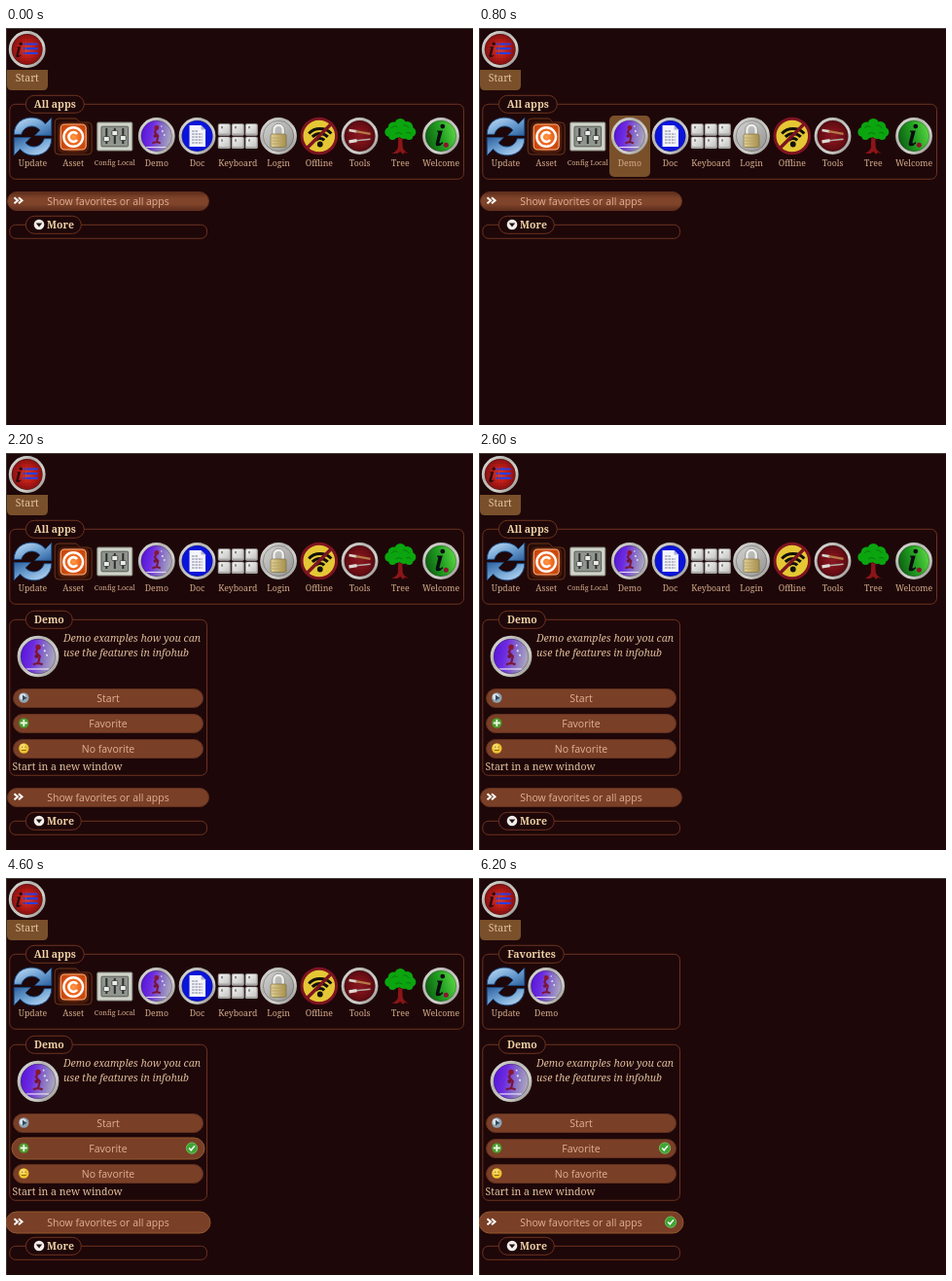
These frames come from a looping animation (480x408 px, 7400 ms). An HTML page:

```html
<!DOCTYPE html>
<html lang="en">
<head>
<meta charset="utf-8">
<title>App launcher</title>
<style>
html, body { margin: 0; width: 100%; height: 100%; overflow: hidden; background: #1e0709; }
svg { display: block; width: 480px; height: 408px; }
text { font: 10.5px "Noto Serif", serif; fill: #e4c29e; }
.mid { text-anchor: middle; }
.title { font-weight: bold; fill: #efd2a6; }
.label { font-size: 8.7px; fill: #d6ae8c; }
.small { font-size: 7.2px; }
.note { font-style: italic; fill: #dfbc9a; }
.cap { font-family: "Open Sans", "Noto Sans", sans-serif; fill: #dfb196; }
.line { fill: none; stroke: #6c321f; }
.pill { fill: #1e0709; stroke: #6c321f; }
</style>
</head>
<body>
<svg id="stage" viewBox="0 0 480 408" xmlns="http://www.w3.org/2000/svg"></svg>
<script>
const LOOP = 7400;
const stage = document.getElementById('stage');

const box = (x, y, w, h, r, fill, more = '') =>
  `<rect x="${x}" y="${y}" width="${w}" height="${h}" rx="${r}" fill="${fill}" ${more}/>`;
const disc = (x, y, r, fill, more = '') =>
  `<circle cx="${x}" cy="${y}" r="${r}" fill="${fill}" ${more}/>`;
const path = (d, fill, more = '') => `<path d="${d}" fill="${fill}" ${more}/>`;
const stroke = (d, color, w, more = '') =>
  path(d, 'none', `stroke="${color}" stroke-width="${w}" ${more}`);
const text = (x, y, s, cls) => `<text x="${x}" y="${y}" class="${cls}">${s}</text>`;
const group = (id, s, at) =>
  `<g${id ? ` id="${id}"` : ''}${at ? ` transform="${at}"` : ''}>${s}</g>`;
const move = (x, y, s = 1) => `translate(${x} ${y}) scale(${s})`;

const gradient = (id, stops, dir = 'x1="0" y1="0" x2="1" y2="1"') =>
  `<linearGradient id="${id}" ${dir}>${stops.map((c, i) =>
    `<stop offset="${i / (stops.length - 1)}" stop-color="${c}"/>`).join('')}</linearGradient>`;
const radial = (id, stops) =>
  `<radialGradient id="${id}">${stops.map((c, i) =>
    `<stop offset="${i / (stops.length - 1)}" stop-color="${c}"/>`).join('')}</radialGradient>`;

const defs = `<defs>
${gradient('rim', ['#e4e4e0', '#b4b4b0', '#d2d2ce', '#8b8985'])}
${gradient('violet', ['#5312d8', '#6d2be0', '#8b78c4', '#b8b6bd'], 'x1="0" y1=".4" x2="1" y2=".6"')}
${gradient('steel', ['#c9e2f7', '#73a5d5', '#2c609e'])}
${gradient('grass', ['#0b5a10', '#22a022', '#63dc48'], 'x1="0" y1=".6" x2="1" y2=".3"')}
${gradient('silver', ['#d6d6d4', '#8f8f8d'])}
${gradient('key', ['#f4f4f2', '#c4c4c2'])}
${gradient('brass', ['#e3d39a', '#a48d4c'], 'x1="0" y1="0" x2="1" y2="0"')}
${radial('ruby', ['#e0452e', '#bd1c18', '#7c0f0f'])}
${radial('wine', ['#8e1a22', '#7a1019', '#540a10'])}
${radial('ember', ['#ff9a45', '#f26a20', '#c8480f'])}
${radial('glow', ['#ff7a28', '#b8420f', '#4a1a0a'])}
${gradient('shade', ['#5b2c1b', '#80442a', '#80442a', '#5b2c1b'], 'x1="0" y1="0" x2="0" y2="1"')}
<pattern id="mesh" width="3" height="3" patternUnits="userSpaceOnUse">
<path d="M0 0H3M0 0V3" stroke="#000" stroke-opacity=".14" stroke-width=".7" fill="none"/></pattern>
</defs>`;

// Icons are drawn around 0,0 with a radius near 19.
const badge = (fill, inner) =>
  disc(0, 0, 17.6, fill) + inner +
  disc(0, 0, 17.4, 'none', 'stroke="url(#rim)" stroke-width="3"') +
  disc(0, 0, 15.7, 'none', 'stroke="#2a2424" stroke-opacity=".45" stroke-width=".7"');

const info = (x, y, k, color) => group('',
  disc(2, -9, 2.2, color) +
  path('M-3 -5H2L-1 6Q-1 8 2 5.5L2.5 6.5Q-1 10.5 -4 9Q-5 8 -4 5L-2 -3.5H-3Z', color),
  move(x, y, k));

function updateIcon() {
  const arrow = path('M-18 -2C-18 -13 -9 -19 1 -18C6 -17.5 10 -15 12 -12L18 -18V-1H2L7 -6C2 -12 -8 -11 -11 -2Z',
    'url(#steel)', 'stroke="#1c4a80" stroke-width=".9"');
  return group('', arrow + group('', arrow, 'rotate(180)'), 'translate(0 .5) scale(1.07)');
}

function assetIcon() {
  return path('M-19 -14Q-19 -18 -15 -18H3L7 -14H15Q19 -14 19 -10V15Q19 19 15 19H-15Q-19 19 -19 15Z',
      '#260c08', 'stroke="#6d3418"') +
    box(-16, -14.5, 32, 32, 6, 'url(#glow)') +
    box(-13, -12, 26, 26, 4, 'url(#ember)', 'stroke="#ffb27c" stroke-width="1.1"') +
    disc(0, 1, 9.8, 'none', 'stroke="#fff" stroke-width="2.4"') +
    stroke('M3.9 -2A4.8 4.8 0 1 0 3.9 4', '#fff', 2.7);
}

function configIcon() {
  const knobs = [3, -3, 2].map((y, i) => {
    const x = -8.5 + 8.5 * i;
    return stroke(`M${x} -8V8`, '#2b2e30', 2) +
      box(x - 3, y - 2.5, 6, 5, 1, '#e9ebe5', 'stroke="#3b3e40" stroke-width=".9"');
  }).join('');
  return box(-18, -14, 36, 29, 1, '#d0d3c9', 'stroke="#80847b"') +
    box(-13.8, -9.8, 27.6, 20.6, 1, '#90968d', 'stroke="#555a54"') + knobs;
}

function demoIcon() {
  return badge('url(#violet)',
    stroke('M-11 11.5H10', '#e5dcf5', 1.1) +
    stroke('M-4.5 7.5Q0 5 4 7.5M0 6.5L1.5 0L-2 -4L0 -8', '#7b1638', 2) +
    disc(0, -8.5, 2.4, '#8a1730') + disc(-1.5, 0, 1.8, '#731336') +
    disc(6, -5, 1, '#e8def4') + disc(8, -1, .9, '#e8def4') + disc(5, -10, .8, '#e8def4'));
}

function docIcon() {
  const rows = [-5, -2, 1, 4, 7].map((y, i) =>
    `M-5.5 ${y}H${i ? 5.5 : 1}`).join('');
  return badge('#0a14dc',
    path('M-8 -11H4L8.5 -6.5V11H-8Z', '#f4f4fa') +
    path('M4 -11V-6.5H8.5Z', '#a9acc9') +
    stroke(rows, '#7b7e92', 1, 'stroke-dasharray="2.6 .8"'));
}

function keysIcon() {
  let s = '';
  for (let i = 0; i < 6; i++) {
    const x = -20.5 + 14 * (i % 3), y = i < 3 ? -12.7 : 0.7;
    s += box(x, y, 13, 12.4, 1.6, '#a7a7a5') +
      box(x + 1.2, y + .6, 10.6, 9.6, 1.5, 'url(#key)') +
      box(x + 3.2, y + 2.6, 2, 2.4, 0, '#8a8a8a');
  }
  return s;
}

function lockIcon() {
  return badge('url(#silver)',
    stroke('M-5 0V-6A5 5.5 0 0 1 5 -6V0', '#efefed', 3) +
    stroke('M-6.3 0V-6A6.3 6.8 0 0 1 6.3 -6V0', '#73736f', .7) +
    box(-8, -2, 16, 13.5, 1.5, 'url(#brass)', 'stroke="#81723f" stroke-width=".7"') +
    stroke('M-7 2H7M-7 5H7M-7 8H7', '#b49c5c', .8));
}

function offlineIcon() {
  const waves = [6, 11, 16].map(r =>
    stroke(`M${-r * .72} ${-r * .69}A${r} ${r} 0 0 1 ${r * .72} ${-r * .69}`, '#11100a', 3.1)).join('');
  return disc(0, 0, 17.5, '#e5c735') +
    group('', disc(0, 0, 2.9, '#11100a') + waves, 'translate(1 8.5)') +
    stroke('M12 -12L-12 12', '#7c1420', 3.4) +
    disc(0, 0, 17.8, 'none', 'stroke="#7c1420" stroke-width="3"');
}

function toolsIcon() {
  return badge('url(#wine)',
    disc(0, 0, 16, 'url(#mesh)') +
    stroke('M-11 -6L-3 -4.6', '#d8d4ce', 2.6) + stroke('M-4 -4.8L11 -2.2', '#b47a48', 2.2) +
    stroke('M-4 4.8L11 3.2', '#b5b0aa', 1.5) + stroke('M-11 5.8L-3 4.7', '#dedad5', 3.2));
}

function treeIcon() {
  const leaves = [[0, -12, 6], [-7, -9, 5.5], [7, -9, 6], [-11, -4, 5], [11, -4, 5], [-4, -4, 6], [4, -3, 6], [-8, 0, 4], [9, 0, 4]];
  return path('M-2 0L-2.5 12Q-4 16 -9 18H-3L0 16L3 19L4 17L9 18Q4 16 2.5 12L2 4L6 -1L4 -1L1 3Z', '#8b1517') +
    leaves.map(([x, y, r]) => disc(x, y, r, '#0ba50f')).join('') +
    stroke('M-9 -8Q-6 -12 -3 -9M3 -11Q7 -12 9 -8M-5 -2Q-2 -5 2 -2M6 -3Q9 -5 11 -2', '#08790e', 1);
}

const welcomeIcon = () => badge('url(#grass)',
  info(-.5, 0, 1.1, '#0c0c10') + disc(5.3, 9.3, 2.5, '#8f1230'));

const startIcon = () => badge('url(#ruby)',
  disc(0, 0, 16, 'url(#mesh)') + info(-8, 1, .75, '#2a0c10') +
  stroke('M-4 -5.5H11M-4 -.8H11M-4 3.9H11', '#2c3ce0', 2.2, 'stroke-dasharray="2 1 20 0"'));

const apps = [
  ['Update', updateIcon], ['Asset', assetIcon], ['Config Local', configIcon], ['Demo', demoIcon],
  ['Doc', docIcon], ['Keyboard', keysIcon], ['Login', lockIcon], ['Offline', offlineIcon],
  ['Tools', toolsIcon], ['Tree', treeIcon], ['Welcome', welcomeIcon]
];
const appX = i => i < 2 ? 27.5 + 41.7 * i : i === 2 ? 111.8 : 154.8 + 41.75 * (i - 3);

function app(n, slot) {
  const [name, draw] = apps[n], x = appX(slot), tight = n === 2;
  return group('', draw(), move(x, 111)) +
    text(x, tight ? 140.6 : 142.4, name, 'mid label' + (tight ? ' small' : ''));
}

function panel(y, w, h, pillW, title, titleX) {
  return `<rect x="3.8" y="${y + .3}" width="${w - .3}" height="${h}" rx="6" class="line"/>` +
    `<rect x="20.3" y="${y - 8.7}" width="${pillW}" height="18" rx="9" class="pill"/>` +
    text(titleX, y + 4, title, 'mid title');
}

const tick = (x, y) => disc(x, y, 5.7, '#3fa535', 'stroke="#7bd06a" stroke-width=".7"') +
  stroke(`M${x - 2.8} ${y}L${x - .8} ${y + 2.2}L${x + 3} ${y - 2.3}`, '#fff', 1.5);

function button(id, x, y, w, label, icon) {
  const mid = y + 10;
  return box(x + .5, y + .5, w - 1, 19, 9.5, '#7a3f27', `id="${id}" stroke="#62301d"`) +
    icon(mid) + text(105, mid + 3.8, label, 'mid cap') +
    group(id + 'Tick', tick(w > 200 ? 197 : 191, mid - .4));
}

const playMark = y => disc(18.3, y - .5, 5.2, '#8fa3b4') + disc(17.3, y - 1.5, 3.3, '#d5e0e8') +
  path(`M17 ${y - 3.2}L21.5 ${y - .3}L17 ${y + 2.6}Z`, '#344a5c');
const plusMark = y => disc(18.3, y - .5, 5.2, '#4c9b2e') +
  stroke(`M18.3 ${y - 4}V${y + 3}M14.8 ${y - .5}H21.8`, '#eaf7e2', 1.8);
const faceMark = y => disc(18.3, y - .5, 5.2, '#ecc22d') + disc(17.5, y - 2, 3, '#f7dc6c') +
  stroke(`M16 ${y - 1.8}H17.3M19.3 ${y - 1.8}H20.6M16 ${y + 1.4}H20.6`, '#85600f', 1);
const chevrons = y => stroke(`M8.5 ${y - 3.7}L12 ${y - .7}L8.5 ${y + 2.3}M13 ${y - 3.7}L16.5 ${y - .7}L13 ${y + 2.3}`, '#fff', 2);

const detail = panel(171, 203, 160, 48, 'Demo', 44.3) +
  group('', demoIcon(), move(33, 209, 1.13)) +
  text(59, 194, 'Demo examples how you can', 'note') +
  text(59, 208.5, 'use the features in infohub', 'note') +
  button('start', 7, 242, 196, 'Start', playMark) +
  button('fav', 7, 268, 196, 'Favorite', plusMark) +
  button('nofav', 7, 294, 196, 'No favorite', faceMark) +
  text(6.5, 325.5, 'Start in a new window', '');

const lower = button('show', 1, 168, 208, 'Show favorites or all apps', chevrons) +
  panel(202, 203, 14, 57, 'More', 56) +
  disc(34, 202, 5.3, '#f1eeea') + path('M30.8 200.4H37.2L34 204.6Z', '#241012');

stage.innerHTML = defs + box(0, 0, 480, 408, 0, '#1e0709') +
  box(0, 0, 480, 1, 0, '#45423c') + box(0, 0, 1, 408, 0, '#3d3229') +
  group('', startIcon(), move(21.7, 22)) +
  path('M1 43H43V59Q43 64 38 64H6Q1 64 1 59Z', '#79502a') +
  text(21.8, 55, 'Start', 'mid') +
  group('all', panel(78, 467, 77, 60, 'All apps', 50.3) +
    box(134, 90, 42, 63, 5, '#79502a', 'id="hover"') +
    apps.map((_, i) => app(i, i)).join('')) +
  group('picked', panel(78, 203, 77, 67, 'Favorites', 54) + app(0, 0) + app(3, 1)) +
  group('detail', detail) + group('lower', lower);

const $ = id => document.getElementById(id);
const show = (id, on) => $(id).setAttribute('display', on ? 'inline' : 'none');
const set = (el, values) => Object.entries(values).forEach(([k, v]) => el.setAttribute(k, v));

function swell(id, x, y, w, on, fill = '#7a3f27') {
  const d = on ? 1 : -.5;
  set($(id), {
    x: x - d, y: y - d, width: w + 2 * d, height: 20 + 2 * d, rx: 10 + d,
    fill, stroke: on ? '#92582d' : '#62301d'
  });
}

function render(t) {
  const within = (a, b) => t >= a && t < b;
  const open = t >= 1600, chosen = t >= 5400;
  show('all', !chosen);
  show('picked', chosen);
  show('hover', within(600, 2200));
  show('detail', open);
  $('lower').setAttribute('transform', move(0, open ? 176 : 0));
  swell('start', 7, 242, 196, within(2400, 2600));
  swell('fav', 7, 268, 196, within(2800, 5200));
  swell('nofav', 7, 294, 196, false);
  swell('show', 1, 168, 208, within(200, 400) || t >= 4400, open ? '#7a3f27' : 'url(#shade)');
  show('startTick', false);
  show('nofavTick', false);
  show('favTick', t >= 3400);
  show('showTick', chosen);
}

const began = performance.now();
function tickFrame(now) {
  render(Math.max(0, now - began) % LOOP);
  requestAnimationFrame(tickFrame);
}
render(0);
requestAnimationFrame(tickFrame);
</script>
</body>
</html>
```
